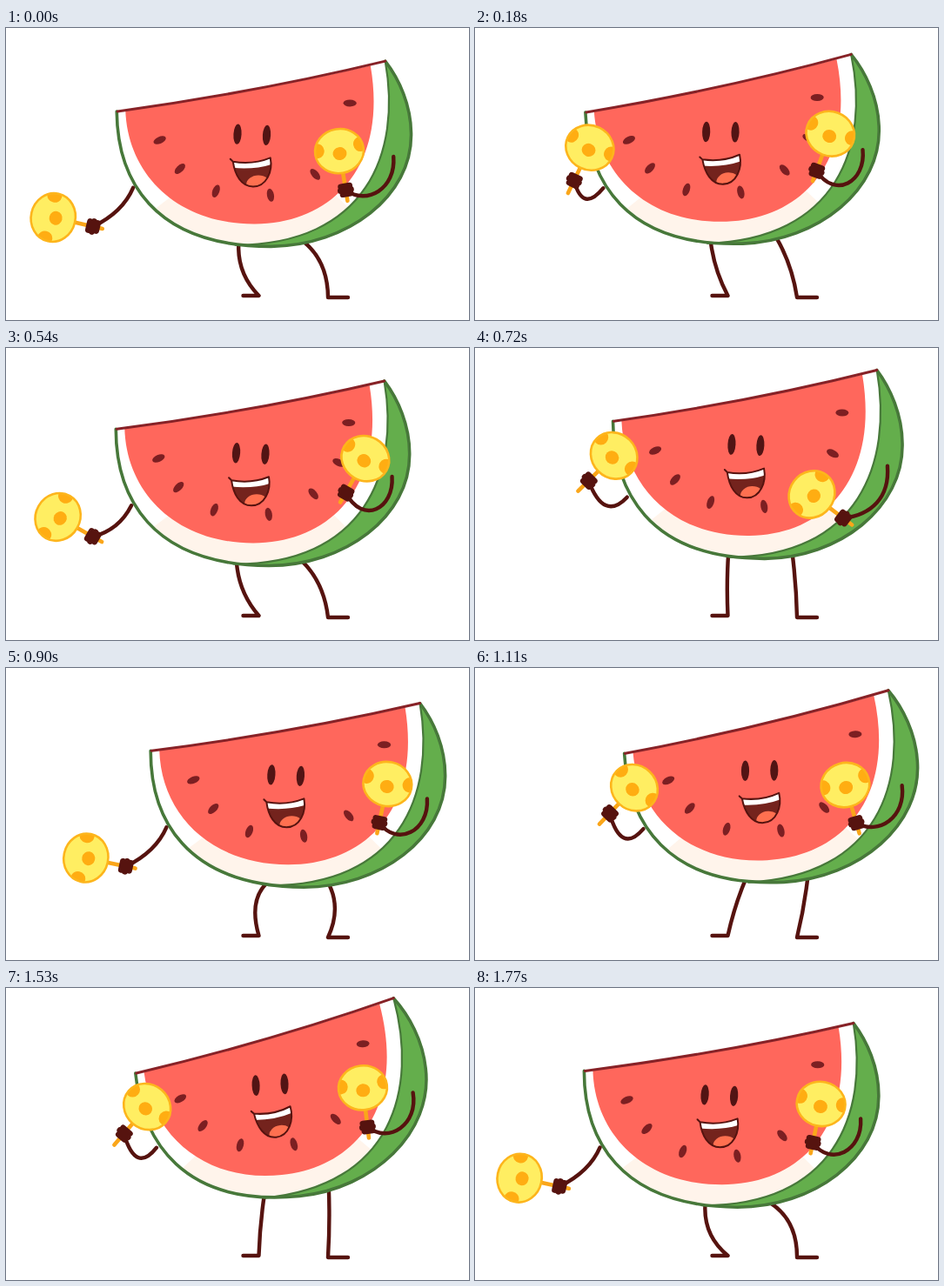
These frames come from a looping animation (532x336 px, 1.8 s). An HTML page:

```html
<!DOCTYPE html>
<html lang="en">
<head>
<meta charset="utf-8">
<title>Dancing watermelon</title>
<style>
html, body { margin: 0; width: 100%; height: 100%; overflow: hidden; background: #fff; }
svg { display: block; width: 100vw; height: 100vh; }
.limb { fill: none; stroke: #56130f; stroke-width: 4.4; stroke-linecap: round; stroke-linejoin: round; }
.seed { fill: #7c1f22; }
.eye { fill: #521414; }
.rim { fill: none; stroke: #47783a; stroke-width: 3.6; stroke-linejoin: round; stroke-linecap: round; }
</style>
</head>
<body>
<svg viewBox="0 0 532 336">
  <defs>
    <clipPath id="face"><path d="M127 94 C127 170 165 250 303 251 L262 249 C412 250 454 145 436 39 Q290 73 127 94Z"/></clipPath>
    <clipPath id="mouth"><path d="M260 153 Q283 157 303 149 C306 165 298 182 283 182 C269 182 262 168 260 153Z"/></clipPath>
    <clipPath id="ball"><ellipse rx="28.5" ry="26"/></clipPath>
    <g id="maraca">
      <path d="M0 26V58" stroke="#faa61a" stroke-width="4.6" stroke-linecap="round"/>
      <ellipse rx="28.5" ry="26" fill="#ffee62"/>
      <g fill="#ffad12" clip-path="url(#ball)">
        <ellipse cy="3" rx="8" ry="7.5"/>
        <ellipse cx="-25" cy="-4" rx="8" ry="8.5"/>
        <ellipse cx="25" cy="-4" rx="8" ry="8.5"/>
      </g>
      <ellipse rx="28" ry="25.5" fill="none" stroke="#fdb51c" stroke-width="2.6"/>
    </g>
    <path id="hand" d="M-5 -4.5H5M-6 0H6M-4 4.5H5" stroke="#56130f" stroke-width="7" stroke-linecap="round"/>
  </defs>
  <path id="legL" class="limb"/>
  <path id="legR" class="limb"/>
  <g id="body">
    <g id="slice">
      <path fill="#64ae4c" d="M127 94 C127 170 165 250 303 251 C390 251 466 195 465 122 C465 90 452 60 436 39 Q290 73 127 94Z"/>
      <g clip-path="url(#face)">
        <path fill="#fff" d="M110 20H460V270H110Z"/>
        <path fill="#fff4eb" d="M160 214L192 190H375L400 215L300 265H170Z"/>
      </g>
      <path fill="#ff675c" d="M137 93 C139 168 197 225 285 225 C374 225 438 160 419 44 Q290 73 137 93Z"/>
      <path class="rim" style="stroke-width:2.2" d="M436 39 C454 145 412 250 262 249"/>
      <path class="rim" d="M127 94 C127 170 165 250 303 251 C390 251 466 195 465 122 C465 90 452 60 436 39"/>
      <path d="M128 94 Q290 73 436 39" fill="none" stroke="#872227" stroke-width="3" stroke-linecap="round"/>
      <g id="seeds"></g>
      <ellipse class="eye" rx="4.6" ry="11.7" transform="translate(265.5 121.5) rotate(4)"/>
      <ellipse class="eye" rx="4.6" ry="11.7" transform="translate(299 123) rotate(4)"/>
      <g clip-path="url(#mouth)">
        <path fill="#74231d" d="M250 140H310V190H250Z"/>
        <ellipse cx="289" cy="180" rx="14" ry="11" fill="#ff7050"/>
        <path fill="#fff" d="M255 145H306V156Q285 163 258 160Z"/>
      </g>
      <path fill="none" stroke="#56130f" stroke-width="2" stroke-linecap="round" stroke-linejoin="round"
        d="M257 150L260 153 Q283 157 303 149 C306 165 298 182 283 182 C269 182 262 168 260 153"/>
    </g>
    <g id="left"><use href="#maraca"/><path class="limb"/><use href="#hand"/></g>
    <g id="right"><use href="#maraca"/><path class="limb"/><use href="#hand"/></g>
  </g>
</svg>
<script>
// four beats make one sway; the loop runs slightly past it before restarting
const LOOP = 1800, STEP = 30, BEAT = 435;
const CX = 281.5, CY = 66.5, TILT = 10.1;
const TAU = 2 * Math.PI, { sin, cos, abs, max } = Math;
const $ = id => document.getElementById(id);

// 0 at phase "low", 1 half a beat later
const swing = (beat, low) => (1 - cos(TAU * (beat - low))) / 2;

$("seeds").innerHTML = [1, 26, 50, 79, 111, 136, 157].map(deg => {
  const a = deg * TAU / 360;
  return `<ellipse class="seed" rx="7.6" ry="4"
    transform="translate(${281 + 114 * cos(a)} ${85 + 109 * sin(a)}) rotate(${deg})"/>`;
}).join("");

// middle of the top edge and its tilt
function bodyPose(beat) {
  const q = beat * TAU / 4;
  const stride = (1 - sin(2 * q)) / 2;       // 1 while crossing over, 0 while staying on a side
  const toRight = cos(q - TAU * 3 / 8) ** 3; // 1 crossing right, -1 crossing left
  return {
    x: 300.5 - 18 * cos(q) - 25 * sin(q) - cos(3 * q) + 8.4 * sin(3 * q) - 3 * sin(5 * q),
    y: 68 - (6 + 8 * stride) * swing(beat, .1),
    tilt: 10 + (3.5 - 3.1 * toRight) * swing(beat, .12)
  };
}

// hand position relative to the body, maraca angle, distance from hand to ball
function leftPose(beat) {
  const h = swing(beat, .08), up = h * h * (3 - 2 * h);
  return {
    x: -183 + up * (7 + 10 * sin(TAU * (beat - .08))),
    y: 160.5 - 65 * up,
    angle: -78 + 125 * up,
    grip: 47 - 6 * up,
    up
  };
}

function rightPose(beat) {
  const a = TAU * (beat - .27);
  const angle = -12 + 52 * cos(a) - 10 * cos(2 * a);
  return { x: 107 + abs(angle) / 11, y: 116 - angle / 2, angle, grip: 45.5 };
}

function drawArm(id, { x, y, angle, grip }, curve) {
  const [maraca, arm, hand] = $(id).children;
  const hx = CX + x, hy = CY + y, place = `translate(${hx} ${hy}) rotate(${angle})`;
  maraca.setAttribute("transform", `${place} translate(0 ${-grip})`);
  hand.setAttribute("transform", place);
  arm.setAttribute("d", `${curve} ${hx} ${hy}`);
}

function drawLeg(id, [x, y], ankleX, ankleY, toe, bendX, bendY) {
  $(id).setAttribute("d",
    `M${x} ${y}Q${(x + ankleX) / 2 + bendX} ${(y + ankleY) / 2 + bendY} ${ankleX} ${ankleY}H${toe}`);
}

function draw(t) {
  const beat = t / BEAT;
  const { x, y, tilt } = bodyPose(beat);
  const turn = TILT - tilt, rad = turn * TAU / 360;
  const squash = 1 - (67 - y) * .0014;
  $("body").setAttribute("transform", `translate(${x} ${y}) rotate(${turn}) translate(${-CX} ${-CY})`);
  $("slice").setAttribute("transform",
    `translate(${CX} ${CY}) scale(${squash} ${1 / squash}) translate(${-CX} ${-CY})`);

  const left = leftPose(beat), right = rightPose(beat);
  drawArm("left", left, `M145 182Q${133 - 15 * left.up} 210`);
  drawArm("right", right, `M444.5 149C447 186 ${CX + right.x + 20 + max(0, right.y - 109) * .35} 205`);

  // hips follow the slice, feet stay planted
  const hip = (hx, hy) => [x + hx * cos(rad) - hy * sin(rad), y + hx * sin(rad) + hy * cos(rad)];
  const bend = max(2, (y - 61) * 2.2), lean = x - 300;
  const hipL = hip(-19 - lean * .17, 181), hipR = hip(55 - lean * .25, 180);
  drawLeg("legL", hipL, 290.5, 308, 272.5, -bend, (278 - hipL[0]) * bend / 32);
  drawLeg("legR", hipR, 370, 310, 393, bend, (hipR[0] - 380) * bend / 54);
}

const start = performance.now();
function tick() {
  const t = (performance.now() - start) % LOOP;
  draw(Math.floor(t / STEP) * STEP);
  requestAnimationFrame(tick);
}
tick();
</script>
</body>
</html>
```
